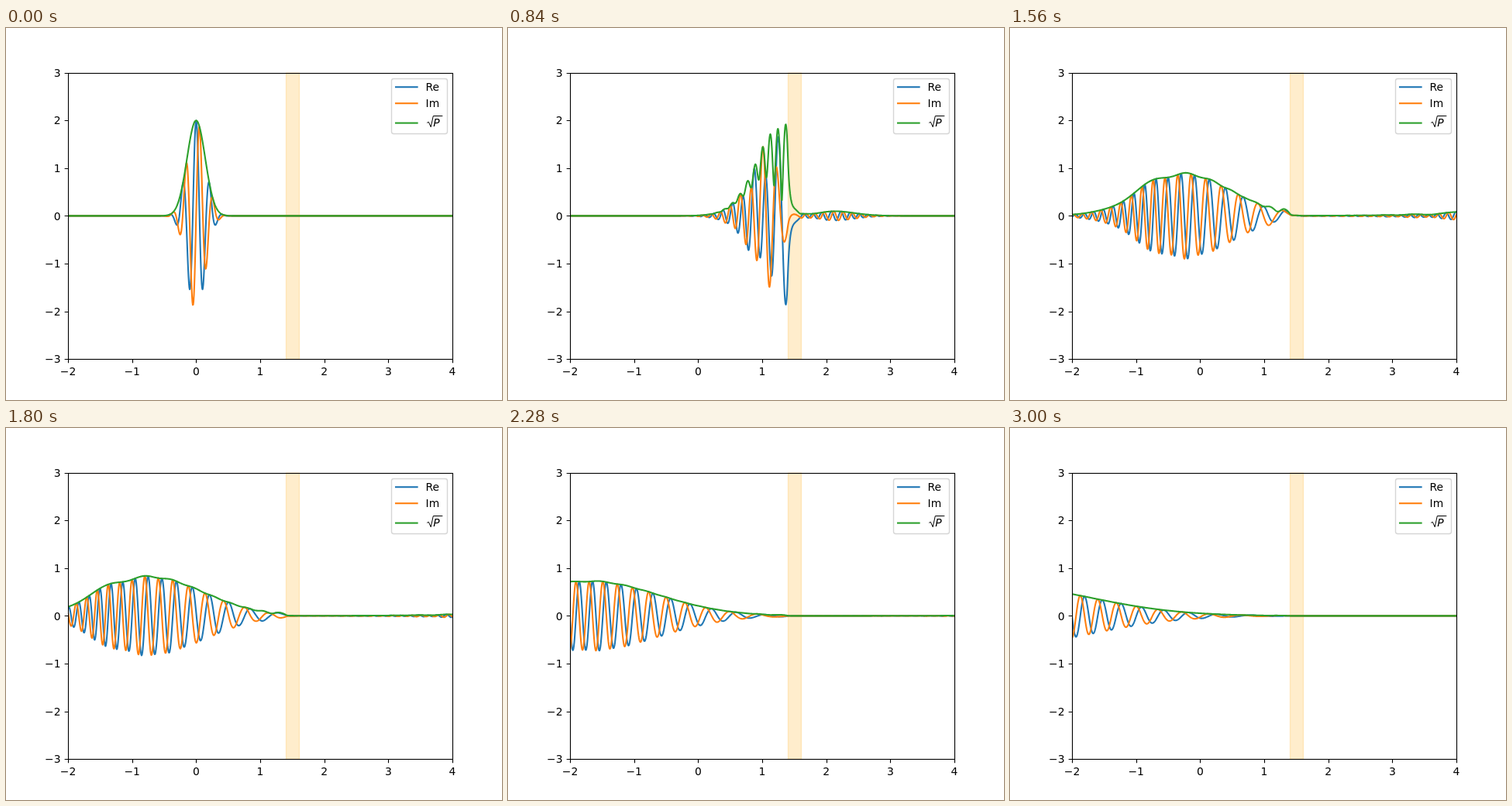
Animation of 640 by 480 pixels, one loop 3030 ms. Source, as an HTML page:

```html
<!DOCTYPE html>
<html lang="en">
<head>
<meta charset="utf-8">
<title>Wave packet at a barrier</title>
<style>
  html, body { margin: 0; width: 100%; height: 100%; overflow: hidden; background: #fff; }
  svg { display: block; width: 640px; height: 480px; }
  text { font: 13.89px "DejaVu Sans", sans-serif; fill: #000; }
  .line { fill: none; stroke-width: 2.083; stroke-linejoin: round; stroke-linecap: square; }
  .re { stroke: #1f77b4; }
  .im { stroke: #ff7f0e; }
  .abs { stroke: #2ca02c; }
  .axis { fill: none; stroke: #000; stroke-width: 1.11; }
</style>
</head>
<body>
<svg viewBox="0 0 640 480">
  <clipPath id="plot"><rect x="80" y="57.6" width="496" height="369.6"/></clipPath>
  <g clip-path="url(#plot)">
    <rect x="361.5" y="57.5" width="17" height="370" fill="#ffa500" fill-opacity=".2"
      stroke="#ffa500" stroke-opacity=".2" stroke-width="1.39"/>
    <path id="re" class="line re"/>
    <path id="im" class="line im"/>
    <path id="abs" class="line abs"/>
  </g>
  <path id="ticks" class="axis"/>
  <rect class="axis" x="80.5" y="58.5" width="496" height="369"/>
  <g id="labels"></g>
  <rect x="497.5" y="65.5" width="72" height="71" rx="2.78" fill="#fff" fill-opacity=".8"
    stroke="#ccc" stroke-opacity=".8" stroke-width="1.39"/>
  <path class="line re" d="M503 76.2H530.6"/>
  <path class="line im" d="M503 97.2H530.6"/>
  <path class="line abs" d="M503 122.6H530.6"/>
  <text x="541.6" y="81">Re</text>
  <text x="541.6" y="102">Im</text>
  <text x="551.3" y="127" font-style="italic" style="font-style:italic">P</text>
  <path d="M543.3 122.3l2-1 2.9 6.4L551.3 113.5H563.3" fill="none" stroke="#000"/>
</svg>
<script>
const FRAME_MS = 30, FRAMES = 101, TIME_STEP = 0.002;
const K0 = 30, WIDTH = 0.04, HEIGHT = 850, LEFT = 1.4, RIGHT = 1.6;
const DK = 0.2, MODES = 300, POINTS = 993;

const $ = id => document.getElementById(id);
const px = x => 80 + (x + 2) * 496 / 6;
const py = y => 242.4 - y * 61.6;
const snap = v => Math.floor(v + 0.5) + 0.5;
const mul = (a, b) => [a[0] * b[0] - a[1] * b[1], a[0] * b[1] + a[1] * b[0]];
const polar = (r, phase) => [r * Math.cos(phase), r * Math.sin(phase)];
const inverse = ([a, b]) => [a / (a * a + b * b), -b / (a * a + b * b)];

const xs = Array.from({ length: POINTS }, (_, i) => -2 + 6 * i / (POINTS - 1));
const ks = Array.from({ length: MODES }, (_, j) => (j + 0.5) * DK);
const modeRe = [], modeIm = [];

// cos(qy) and sin(qy)/q, continued to negative q squared
function waves(q2, y) {
  const q = Math.sqrt(Math.abs(q2));
  return q2 > 0 ? [Math.cos(q * y), Math.sin(q * y) / q]
                : [Math.cosh(q * y), Math.sinh(q * y) / q];
}

// Scattering state of the square barrier, weighted by the packet's spectrum
function buildMode(k) {
  const q2 = k * k - 2 * HEIGHT;
  const [c, s] = waves(q2, LEFT - RIGHT);
  const incoming = [c, (k + q2 / k) * s / 2];
  const reflected = [0, (k - q2 / k) * s / 2];
  const peak = (2 / (Math.PI * WIDTH)) ** 0.25;
  const weight = peak * Math.sqrt(WIDTH / (4 * Math.PI)) * DK
    * Math.exp(-WIDTH / 4 * (k - K0) ** 2);
  const start = polar(weight, k * LEFT);
  const through = mul(start, inverse(incoming));
  const back = mul(through, reflected);
  const re = new Float64Array(POINTS), im = new Float64Array(POINTS);
  xs.forEach((x, i) => {
    let value;
    if (x < LEFT) {
      const a = mul(start, polar(1, k * (x - LEFT)));
      const b = mul(back, polar(1, -k * (x - LEFT)));
      value = [a[0] + b[0], a[1] + b[1]];
    } else if (x < RIGHT) {
      const [cx, sx] = waves(q2, x - RIGHT);
      value = mul(through, [cx, k * sx]);
    } else {
      value = mul(through, polar(1, k * (x - RIGHT)));
    }
    re[i] = value[0];
    im[i] = value[1];
  });
  modeRe.push(re);
  modeIm.push(im);
}

function waveAt(t) {
  const re = new Float64Array(POINTS), im = new Float64Array(POINTS);
  ks.forEach((k, j) => {
    const [c, s] = polar(1, -k * k * t / 2);
    const mr = modeRe[j], mi = modeIm[j];
    for (let i = 0; i < POINTS; i++) {
      re[i] += c * mr[i] - s * mi[i];
      im[i] += c * mi[i] + s * mr[i];
    }
  });
  return { re, im, abs: re.map((r, i) => Math.hypot(r, im[i])) };
}

function drawAxes() {
  let ticks = "", labels = "";
  const name = n => String(n).replace("-", "\u2212");
  for (let n = -2; n <= 4; n++) {
    ticks += `M${snap(px(n))} 427.5v4.86`;
    labels += `<text x="${px(n)}" y="447.5" text-anchor="middle">${name(n)}</text>`;
  }
  for (let n = -3; n <= 3; n++) {
    ticks += `M80.5 ${snap(py(n))}h-4.86`;
    labels += `<text x="70.5" y="${py(n) + 5.1}" text-anchor="end">${name(n)}</text>`;
  }
  $("ticks").setAttribute("d", ticks);
  $("labels").innerHTML = labels;
}

let shown = -1;
function render(now) {
  const frame = Math.floor(now / FRAME_MS) % FRAMES;
  if (frame !== shown) {
    shown = frame;
    const wave = waveAt(frame * TIME_STEP);
    for (const part in wave) {
      const points = xs.map((x, i) => px(x).toFixed(2) + " " + py(wave[part][i]).toFixed(2));
      $(part).setAttribute("d", "M" + points.join("L"));
    }
  }
}

drawAxes();
ks.forEach(buildMode);
render(0);
const origin = performance.now();
function tick() {
  render(performance.now() - origin);
  requestAnimationFrame(tick);
}
requestAnimationFrame(tick);
</script>
</body>
</html>
```
